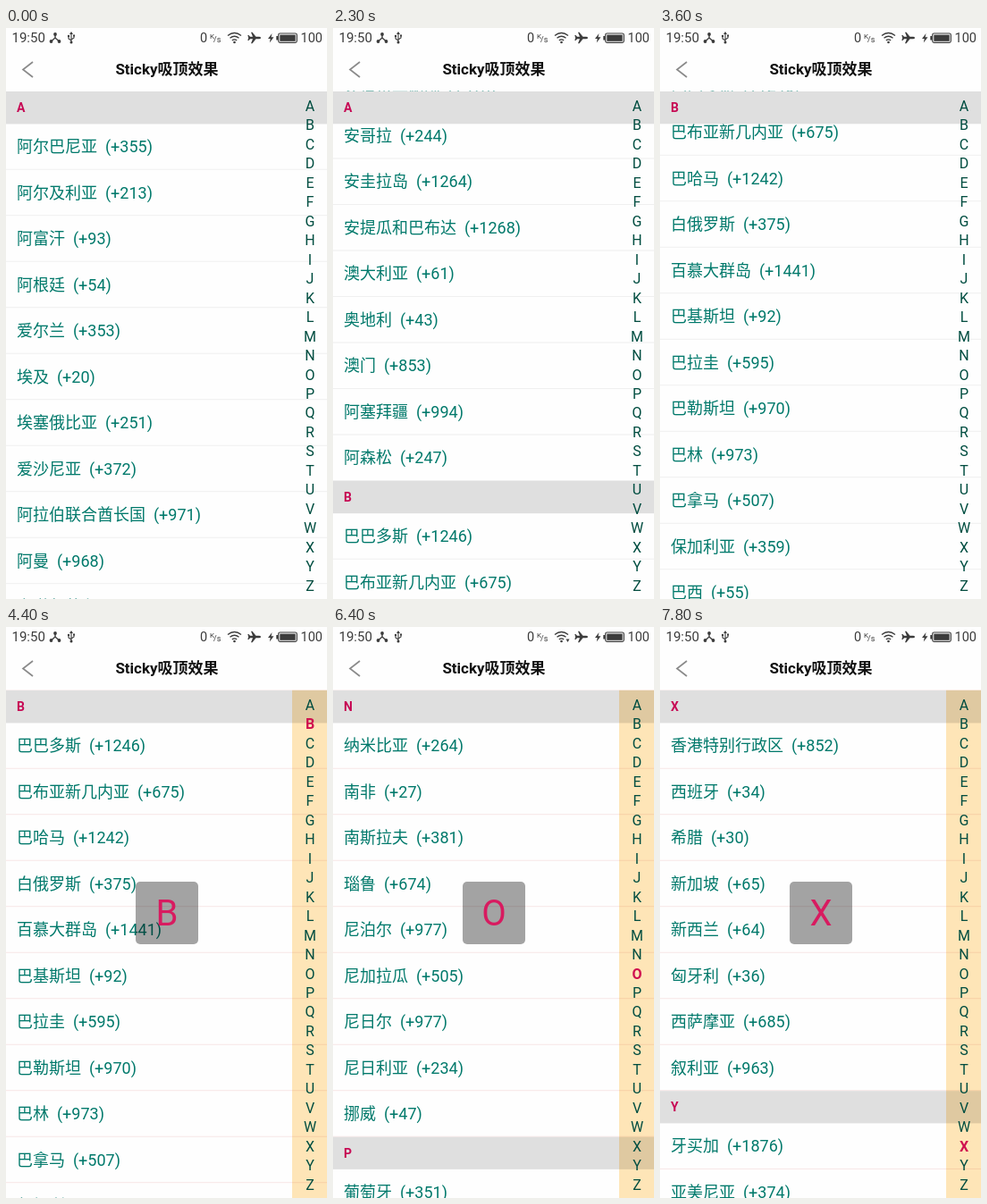
Animation, 359 px wide and 639 px high, one loop 8000 ms. Source, as an HTML page:

```html
<!DOCTYPE html>
<html lang="zh-CN">
<head>
<meta charset="utf-8">
<title>Sticky list</title>
<style>
  html, body { margin: 0; width: 100%; height: 100%; overflow: hidden; background: #fefefe; }
  svg { display: block; width: 359px; height: 639px; font-family: Roboto, "Noto Sans CJK SC", "Noto Sans CJK", sans-serif; }
  .row { font-size: 18px; fill: #00796b; }
  .head { font-size: 14px; font-weight: 700; fill: #c70a55; }
  .key { font-size: 16px; fill: #004d40; text-anchor: middle; }
  .key.on { fill: #d0104f; font-weight: 700; }
  .status { fill: #3c3c3c; }
  .rule { fill: #efefef; }
  .pressed .rule { fill: #f7e6e6; }
</style>
</head>
<body>
<svg id="stage" viewBox="0 0 359 639">
  <rect width="359" height="639" fill="#fefefe"/>
  <g id="list"></g>
  <g id="sticky">
    <rect y="71" width="359" height="36.3" fill="#dfdfdf"/>
    <text id="stickyText" class="head" x="12" y="94">A</text>
  </g>
  <rect id="panel" x="320" y="70.5" width="39" height="569" fill="#ffe6b8" style="mix-blend-mode:multiply"/>
  <g id="keys"></g>
  <g id="popup">
    <rect x="145" y="285" width="70" height="70" rx="5" fill="#000" fill-opacity=".36"/>
    <text id="popupText" x="180" y="334" font-size="40" fill="#d81b60" text-anchor="middle">A</text>
  </g>

  <rect width="359" height="70.5" fill="#fefefe"/>
  <path d="M30 38L19 46.5L30 55" fill="none" stroke="#8a8a8a" stroke-width="1.7"/>
  <text x="180" y="52" font-size="17" font-weight="700" text-anchor="middle" fill="#111">Sticky吸顶效果</text>
  <g class="status">
    <text x="6.5" y="16.3" font-size="15">19:50</text>
    <text x="217" y="16.3" font-size="14.5">0</text>
    <text x="228" y="11.5" font-size="8">K</text>
    <text x="232" y="16" font-size="9">/s</text>
    <text x="329.5" y="16.3" font-size="14.5">100</text>
    <g fill="none" stroke="#3c3c3c" stroke-width="1.4">
      <path d="M55 7V11L50.5 15M55 11L59.5 15"/>
      <path d="M73 6V16M70 9V12L73 14M76 8.500V11L73 13" stroke-width="1.1"/>
      <path d="M248 8.500Q255.500 2.500 263 8.500M250.500 11.300Q255.500 7.300 260.500 11.300M252.900 13.900Q255.500 11.800 258.100 13.900"/>
      <rect x="304.700" y="6" width="20.600" height="10.400" rx="1.800" stroke-width="1.200"/>
    </g>
    <circle cx="55" cy="7" r="1.900"/><circle cx="50.500" cy="15" r="1.900"/><circle cx="59.500" cy="15" r="1.900"/>
    <path d="M73 4L75 7H71Z"/><circle cx="73" cy="16" r="1.500"/><circle cx="70" cy="9" r="1.200"/><rect x="75" y="7.500" width="2" height="2"/>
    <circle cx="255.500" cy="16" r="1.300"/>
    <path id="traffic" d="M260.500 13.500H264.500L262.500 17Z"/>
    <path d="M285 11Q285 9.800 283 9.800H279.500L275.500 4.800H274L276 9.800H273L271.500 8H270.300L271.200 11L270.300 14H271.500L273 12.200H276L274 17.200H275.500L279.500 12.200H283Q285 12.200 285 11Z"/>
    <path d="M297.500 6L293 12H295.700L294.800 16.500L299.500 10.200H296.600Z"/>
    <rect x="306.300" y="7.600" width="17.400" height="7.200"/><rect x="302.300" y="9" width="1.800" height="4.500"/>
  </g>
</svg>
<script>
const SECTIONS = {
  A: '阿尔巴尼亚 355,阿尔及利亚 213,阿富汗 93,阿根廷 54,爱尔兰 353,埃及 20,埃塞俄比亚 251,爱沙尼亚 372,阿拉伯联合酋长国 971,阿曼 968,安道尔共和国 376,安哥拉 244,安圭拉岛 1264,安提瓜和巴布达 1268,澳大利亚 61,奥地利 43,澳门 853,阿塞拜疆 994,阿森松 247',
  B: '巴巴多斯 1246,巴布亚新几内亚 675,巴哈马 1242,白俄罗斯 375,百慕大群岛 1441,巴基斯坦 92,巴拉圭 595,巴勒斯坦 970,巴林 973,巴拿马 507,保加利亚 359,巴西 55,贝宁 229',
  C: '朝鲜 850,赤道几内亚 240',
  D: '丹麦 45,德国 49,东萨摩亚 684,多哥 228,多米尼加共和国 1890',
  E: '厄瓜多尔 593,俄罗斯 7',
  F: '法国 33,法属玻利尼西亚 689,法属圭亚那 594,斐济 679,菲律宾 63,芬兰 358',
  G: '冈比亚 220,刚果(步) 242,刚果(金) 242,格林纳达 1809,格鲁吉亚 995,哥伦比亚 57,哥斯达黎加 506,古巴 53,关岛 1671,圭亚那 592',
  H: '海地 509,韩国 82,哈萨克斯坦 7,荷兰 31,荷属安的列斯 599,洪都拉斯 504',
  J: '加纳 233,加拿大 1,柬埔寨 855,加蓬 241,吉布提 253,捷克 420,吉尔吉斯坦 996,津巴布韦 263,几内亚 224',
  K: '开曼群岛 1345,喀麦隆 237,卡塔尔 974,科摩罗 269,科特迪瓦 225,科威特 965,克罗地亚 385,肯尼亚 254,库克群岛 682',
  L: '莱索托 266,老挝 856,拉脱维亚 371,黎巴嫩 961,利比里亚 231,利比亚 218,列支敦士登 423,立陶宛 370,卢森堡 352,罗马尼亚 40',
  M: '马达加斯加 261,马尔代夫 960,马耳他 356,马拉维 265,马来西亚 60,马里 223,马里亚那群岛 1670,马提尼克 596,毛里求斯 230,美国 1',
  N: '纳米比亚 264,南非 27,南斯拉夫 381,瑙鲁 674,尼泊尔 977,尼加拉瓜 505,尼日尔 977,尼日利亚 234,挪威 47',
  P: '葡萄牙 351',
  R: '日本 81,瑞典 46,瑞士 41',
  S: '萨尔瓦多 503,塞拉利昂 232,塞内加尔 221,塞浦路斯 357,塞舌尔 248,沙特阿拉伯 966,圣卢西亚 1758,圣马力诺 378,斯里兰卡 94,斯洛伐克 421',
  T: '泰国 66,台湾 886,塔吉克斯坦 992,汤加 676,坦桑尼亚 255,土耳其 90,突尼斯 216',
  W: '危地马拉 502,委内瑞拉 58,文莱 673,乌干达 256,乌克兰 380',
  X: '香港特别行政区 852,西班牙 34,希腊 30,新加坡 65,新西兰 64,匈牙利 36,西萨摩亚 685,叙利亚 963',
  Y: '牙买加 1876,亚美尼亚 374'
};
const LOOP = 8000, TOP = 71, HEAD = 36.2, ROW = 51.5;
const $ = id => document.getElementById(id);

function add(parent, tag, attrs, text) {
  const el = document.createElementNS('http://www.w3.org/2000/svg', tag);
  for (const k in attrs) el.setAttribute(k, attrs[k]);
  if (text) el.textContent = text;
  parent.appendChild(el);
  return el;
}

// Lay out the list and remember where each section starts.
const heads = [];
let y = 0;
for (const letter in SECTIONS) {
  heads.push({ letter, y });
  add($('list'), 'rect', { y: TOP + y, width: 359, height: HEAD, fill: '#dfdfdf' });
  add($('list'), 'text', { class: 'head', x: 12, y: TOP + y + 23 }, letter);
  y += HEAD;
  for (const item of SECTIONS[letter].split(',')) {
    const [name, code] = item.split(' ');
    add($('list'), 'text', { class: 'row', x: 12, y: TOP + y + 32 }, `${name}\u00a0\u00a0(+${code})`);
    add($('list'), 'rect', { class: 'rule', y: TOP + y + ROW - 1, width: 359, height: 1 });
    y += ROW;
  }
}

const keys = [...'ABCDEFGHIJKLMNOPQRSTUVWXYZ'].map((c, i) =>
  add($('keys'), 'text', { class: 'key', x: 340, y: 92.8 + i * 21.48 }, c));

// Swipe: time, offset, speed per ms.
const SWIPE = [[1350, 0, .4], [2300, 578.7, .75], [3000, 975.7, .25], [3950, 1100, 0]];
// Letter under the finger and the moment it is reached.
const TOUCH = [
  [4100, 'A'], [4300, 'B'], [4500, 'C'], [4700, 'D'], [5000, 'E'], [5100, 'F'], [5200, 'G'],
  [5300, 'H'], [5500, 'J'], [5600, 'K'], [5800, 'L'], [6000, 'M'], [6200, 'N'], [6400, 'O'],
  [6600, 'P'], [6700, 'Q'], [7000, 'R'], [7100, 'S'], [7200, 'T'], [7400, 'U'], [7500, 'V'],
  [7600, 'W'], [7700, 'X']
];

function swipe(t) {
  if (t <= SWIPE[0][0]) return 0;
  const i = SWIPE.findIndex(p => p[0] >= t);
  if (i < 0) return SWIPE[SWIPE.length - 1][1];
  const [t0, s0, v0] = SWIPE[i - 1], [t1, s1, v1] = SWIPE[i];
  const d = t1 - t0, u = (t - t0) / d, w = 1 - u;
  return s0 * (1 + 2 * u) * w * w + v0 * d * u * w * w
       + s1 * u * u * (3 - 2 * u) - v1 * d * u * u * w;
}

function draw(ms) {
  const t = Math.floor(ms / 100) * 100;   // the screen refreshes ten times a second
  const touch = TOUCH.filter(p => p[0] <= t).pop();
  const letter = touch ? touch[1] : '';
  const scroll = letter ? heads.filter(h => h.letter <= letter).pop().y : swipe(t);

  const at = heads.filter(h => h.y <= scroll + .01).length - 1;
  const next = heads[at + 1];
  const push = next ? Math.min(0, next.y - scroll - HEAD) : 0;
  $('list').setAttribute('transform', `translate(0 ${-scroll})`);
  $('sticky').setAttribute('transform', `translate(0 ${push})`);
  $('stickyText').textContent = heads[at].letter;

  $('stage').classList.toggle('pressed', !!letter);
  $('panel').style.display = $('popup').style.display = letter ? '' : 'none';
  $('popupText').textContent = letter;
  keys.forEach(k => k.classList.toggle('on', k.textContent === letter));
  $('traffic').style.display = t >= 6200 && t < 7000 ? '' : 'none';
}

const start = performance.now();
function tick() {
  draw((performance.now() - start) % LOOP);
  requestAnimationFrame(tick);
}
tick();
</script>
</body>
</html>
```
